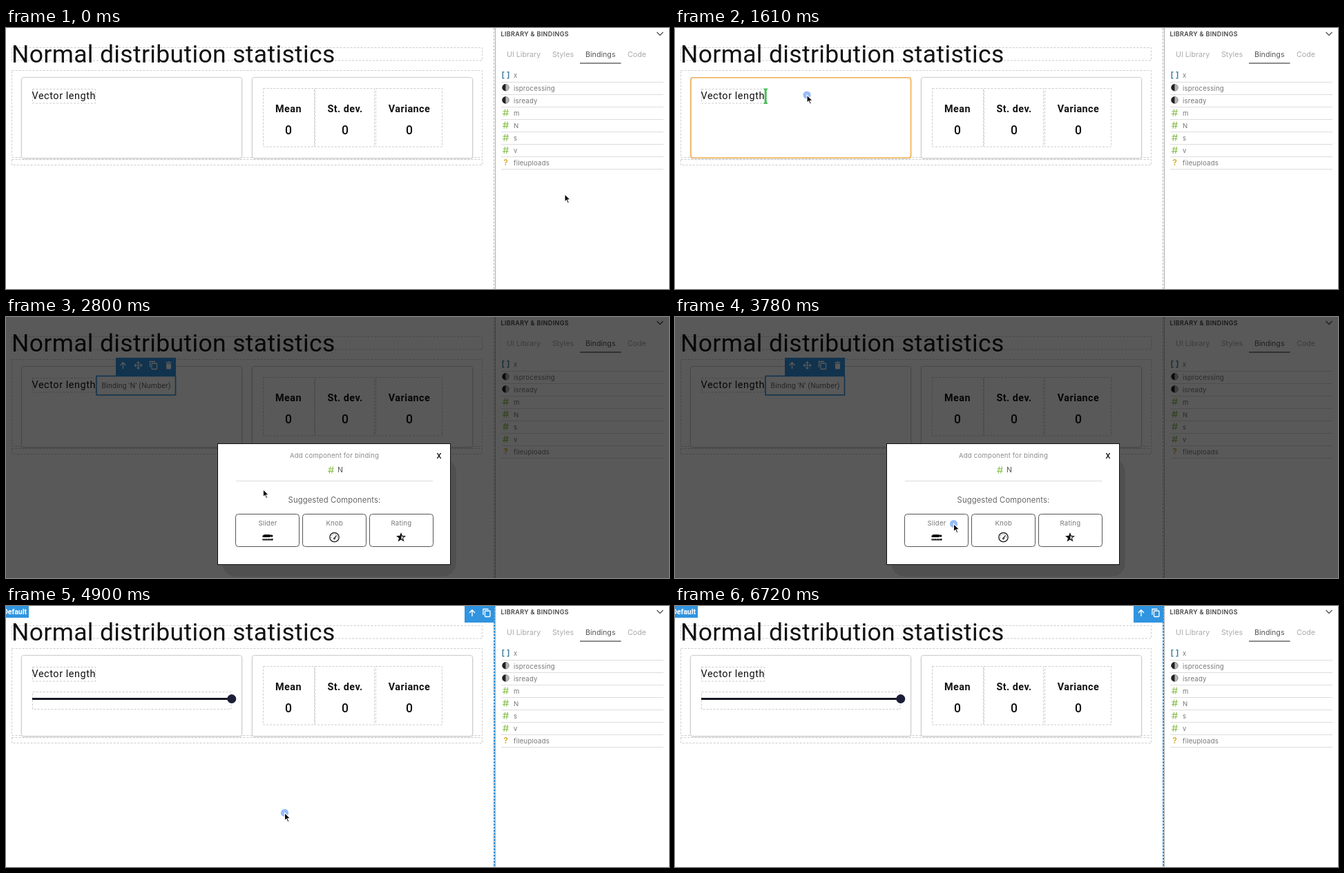
An HTML page for the animation above (7420 ms loop, 960x378 px).

```html
<!DOCTYPE html>
<html lang="en">
<head>
<meta charset="utf-8">
<title>Binding a slider</title>
<style>
  html, body { margin: 0; width: 100%; height: 100%; overflow: hidden; background: #fff; }
  svg { display: block; width: 960px; height: 378px; }
  text { font-family: Inter, "Open Sans", sans-serif; }
  .roboto { font-family: Roboto, sans-serif; fill: #111; }
  .title { font-size: 35.5px; letter-spacing: .35px; }
  .label { font-size: 14.4px; letter-spacing: .57px; }
  .head { font-size: 14.4px; font-weight: 700; letter-spacing: .45px; }
  .value { font-size: 17.5px; font-weight: 500; }
  .hint { font-size: 10.5px; letter-spacing: .2px; fill: #666; }
  .tag { font-size: 10.5px; font-weight: 700; fill: #fff; }
  .section { font-size: 9px; font-weight: 600; letter-spacing: .35px; fill: #444; }
  .tab { font-size: 10.7px; fill: #aaa; }
  .tab.active { fill: #555; }
  .small { font-size: 9.6px; letter-spacing: .2px; fill: #777; }
  .suggest { font-size: 11.2px; letter-spacing: .15px; fill: #666; }
  .mid { text-anchor: middle; }
  .dash { fill: none; stroke: #ccc; stroke-dasharray: 3 2; }
  .card { fill: #fff; stroke: #ccc; filter: drop-shadow(0 1px 1px #0002); }
  .blue { fill: #3094e0; }
  .select { fill: none; stroke: #3094e0; stroke-width: 1.6; }
  .rule { stroke: #ddd; }
  .button { fill: #fff; stroke: #555; }
</style>
</head>
<body>
<svg viewBox="0 0 960 378">
  <defs>
    <g id="up" fill="none" stroke="#fff" stroke-width="1.4"><path d="M0 5V-4M-4 0L0-4.2L4 0"/></g>
    <g id="move" fill="none" stroke="#fff" stroke-width="1.2">
      <path d="M-5 0H5M0-5V5M-2-3.2L0-5.2L2-3.2M-2 3.2L0 5.2L2 3.2M-3.2-2L-5.2 0L-3.2 2M3.2-2L5.2 0L3.2 2"/>
    </g>
    <g id="copy" fill="none" stroke="#fff" stroke-width="1.3">
      <rect x="-2.5" y="-3" width="7.5" height="8.5" rx="1"/><path d="M-5 3V-5.5H2.5"/>
    </g>
    <g id="trash" fill="#fff"><path d="M-4-4.8H-1.5V-5.6H1.5V-4.8H4V-3.4H-4ZM-3.5-2.6H3.5V4.4Q3.5 5.4 2.5 5.4H-2.5Q-3.5 5.4-3.5 4.4Z"/></g>
    <g id="toolbar">
      <rect class="blue" width="87" height="26"/>
      <use href="#up" x="10.5" y="11"/><use href="#move" x="32.5" y="11"/>
      <use href="#copy" x="54.5" y="11"/><use href="#trash" x="76.5" y="11"/>
    </g>
    <path id="hash" d="M-.8-5L-2.4 5M2.8-5L1.2 5M-4-1.8H4.4M-4.4 1.8H4" fill="none" stroke="#8cc152" stroke-width="1.15"/>
    <g id="half"><circle r="4.8" fill="#b5b5b5" stroke="#777" stroke-width=".8"/><path d="M0-5A5 5 0 0 0 0 5Z" fill="#222"/></g>
    <path id="array" d="M-2-4.5H-4.2V4.5H-2M2-4.5H4.2V4.5H2" fill="none" stroke="#4b87a3" stroke-width="1.6"/>
    <text id="unknown" class="mid" y="4.2" font-size="12" font-weight="700" fill="#dcb03a">?</text>
  </defs>

  <rect width="960" height="378" fill="#fff"/>
  <rect class="dash" x="8.5" y="28.5" width="681" height="18.5"/>
  <text class="roboto title" x="8" y="50">Normal distribution statistics</text>
  <rect class="dash" x="8.5" y="61.5" width="681" height="126"/>
  <rect class="dash" x="8.5" y="190.5" width="681" height="8"/>
  <rect class="card" x="22.5" y="71.5" width="319" height="117" rx="3"/>
  <rect class="card" x="356.5" y="71.5" width="319" height="117" rx="3"/>
  <rect class="dash" x="38.5" y="88.5" width="91" height="20.5"/>
  <text class="roboto label" x="37.5" y="103">Vector length</text>
  <g id="table"></g>

  <path class="dash" d="M706.5 0V378" style="stroke:#bbb"/>
  <path d="M708.5 0V378" stroke="#aaa"/>
  <text class="section" x="716.5" y="12">LIBRARY &amp; BINDINGS</text>
  <path d="M942.5 6L947 10.5L951.5 6" fill="none" stroke="#555" stroke-width="1.3"/>
  <text class="tab" x="725" y="42">UI Library</text>
  <text class="tab" x="791" y="42">Styles</text>
  <text class="tab active" x="839" y="42">Bindings</text>
  <text class="tab" x="900" y="42">Code</text>
  <path d="M831 51H890.5" stroke="#666" stroke-width="1.6"/>
  <g id="rows"></g>

  <g data-show="1400-1960">
    <rect x="23" y="72" width="318.5" height="116" rx="3" fill="none" stroke="#f5b55a" stroke-width="1.7"/>
    <path d="M128 87.5H134.5L132.7 91V106.5L134.5 110H128L129.8 106.5V91Z" fill="#4cbf5c"/>
  </g>

  <g data-show="1960-3850">
    <use href="#toolbar" x="159" y="59"/>
    <rect class="select" x="131" y="85.5" width="114.5" height="27.5"/>
    <text class="roboto hint" x="138.5" y="103" style="fill:#666">Binding 'N' (Number)</text>
    <rect width="960" height="378" opacity=".65"/>
    <rect x="313" y="205" width="339" height="171" rx="20" opacity=".1"/>
    <rect x="306.5" y="183.5" width="337" height="175" fill="#fff" stroke="#111"/>
    <text class="small mid" x="475.5" y="204.3" style="fill:#8a8a8a">Add component for binding</text>
    <text class="roboto mid" x="627" y="205" font-size="11" font-weight="500">X</text>
    <use href="#hash" x="470.5" y="221.5"/>
    <text x="480" y="225" font-size="10.5" fill="#555">N</text>
    <path class="rule" d="M333 237.5H618.5"/>
    <text class="suggest mid" x="475.5" y="268.5">Suggested Components:</text>
    <g id="buttons"></g>
    <g transform="translate(379 319)" fill="#111">
      <path d="M-7.5-2.5L-5-4H3V0H-7.5ZM3-3.5H6Q7.5-3.5 7.5-2T6-.5H3Z"/>
      <path d="M-7.5 2H7.5V4.5H-7.5Z"/>
      <path d="M-5.5 2V3.4M-3 2V3.4M-.5 2V3.4M2 2V3.4M4.5 2V3.4" stroke="#fff" stroke-width=".8"/>
    </g>
    <g transform="translate(475.5 319)" fill="none" stroke="#111">
      <circle r="6.7" stroke-width="1.2"/>
      <path d="M-4.5 1A4.6 4.6 0 1 1 4.5 1" stroke-width=".9" stroke-dasharray="1 1.8"/>
      <path d="M0 1.5L2.8-2.5" stroke-width="1.3"/><circle cy="1.8" r="1.1"/>
    </g>
    <g transform="translate(572 319)">
      <path d="M0-7L1.9-2.2L7-2L3 1.2L4.4 6.3L0 3.4L-4.4 6.3L-3 1.2L-7-2L-1.9-2.2Z" fill="#111"/>
      <path d="M.5-3L1.2-1L4-.9L1.8 .9L2.5 3.6L.5 2.2Z" fill="#fff"/>
    </g>
  </g>

  <g data-show="3920-7420">
    <rect class="dash" x="38.5" y="124.5" width="287.5" height="25"/>
    <path d="M38 134.5H326" stroke="#14161f" stroke-width="3"/>
    <circle cx="326.8" cy="134.5" r="6.5" fill="#1c1e38"/>
  </g>
  <g data-show="3850-4410">
    <rect class="blue" x="38" y="104" width="36" height="19.5"/>
    <text class="roboto tag" x="41.5" y="117">Slider</text>
    <use href="#toolbar" x="239.5" y="97"/>
    <rect id="outline" class="select" x="38" y="124" width="288" height="15"/>
  </g>
  <g data-show="4410-7420">
    <rect class="blue" width="33" height="17"/>
    <text class="roboto tag" x="30" y="12" text-anchor="end">Default</text>
    <rect class="blue" x="664" width="43.5" height="24"/>
    <use href="#up" x="675" y="10"/><use href="#copy" x="696" y="10"/>
    <path d="M707 0V378" fill="none" stroke="#3094e0" stroke-width="2" stroke-dasharray="3 1.5"/>
  </g>

  <g id="pointer">
    <circle data-show="1120-2030 3780-4060 4340-5180" r="5.6" fill="#4285f4" opacity=".55"/>
    <path d="M0 0V11.3L2.6 8.9L4.4 13.2L6.3 12.4L4.5 8.2H8.2Z" stroke="#fff" stroke-width="1.1"/>
  </g>
</svg>
<script>
const LOOP = 7420, STEP = 70;
const $ = id => document.getElementById(id);

const columns = [["Mean", 372.5, 74, 409], ["St. dev.", 447.5, 86, 491], ["Variance", 535.5, 96, 584]];
$("table").innerHTML = columns.map(([name, x, width, center]) => `
  <rect class="dash" x="${x}" y="87.5" width="${width}" height="84.5"/>
  <text class="roboto head mid" x="${center}" y="121.5">${name}</text>
  <text class="roboto value mid" x="${center}" y="153.5">0</text>`).join("");

const bindings = [["array", "x"], ["half", "isprocessing"], ["half", "isready"], ["hash", "m"],
  ["hash", "N"], ["hash", "s"], ["hash", "v"], ["unknown", "fileuploads"]];
$("rows").innerHTML = bindings.map(([icon, name], i) => {
  const y = 68.7 + i * 18.1;
  return `<use href="#${icon}" x="723.5" y="${y - .5}"/>
    <text class="small" x="735" y="${y + 3.7}">${name}</text>
    <path class="rule" d="M717 ${Math.round(y + 9) + .5}H952"/>`;
}).join("");

$("buttons").innerHTML = ["Slider", "Knob", "Rating"].map((name, i) => `
  <rect class="button" x="${332.5 + i * 97}" y="285.5" width="92" height="47" rx="4"/>
  <text class="small mid" x="${379 + i * 96.7}" y="301.5">${name}</text>`).join("");

const linear = u => u;
const smooth = u => u * u * (3 - 2 * u);
const easeIn = u => u * u;
const easeOut = u => u * (2 - u);

// Pointer stops: time, x, y, easing on the way there
const stops = [
  [0, 809, 240.5], [70, 809, 240.5], [840, 784, 140, smooth], [1050, 784, 140],
  [1610, 191, 97, smooth], [1960, 191, 97], [2660, 352, 217, easeIn], [3290, 403.5, 299.5, easeOut],
  [5670, 403.5, 299.5], [5740, 405.5, 303.5], [6440, 419, 356], [6720, 428, 381], [LOOP, 428, 381]
];

function pointerAt(t) {
  const i = stops.findIndex(stop => stop[0] > t);
  const [t0, x0, y0] = stops[i - 1];
  const [t1, x1, y1, ease = linear] = stops[i];
  const u = ease((t - t0) / (t1 - t0));
  return [x0 + (x1 - x0) * u, y0 + (y1 - y0) * u];
}

const timed = [...document.querySelectorAll("[data-show]")].map(node => ({
  node, spans: node.dataset.show.split(" ").map(span => span.split("-").map(Number))
}));

function draw() {
  const t = Math.floor(performance.now() % LOOP / STEP) * STEP;
  for (const { node, spans } of timed)
    node.style.display = spans.some(([from, to]) => t >= from && t < to) ? "" : "none";
  $("outline").setAttribute("height", t < 3920 ? 15 : 26);
  $("pointer").setAttribute("transform", `translate(${pointerAt(t)})`);
  requestAnimationFrame(draw);
}
draw();
</script>
</body>
</html>
```
